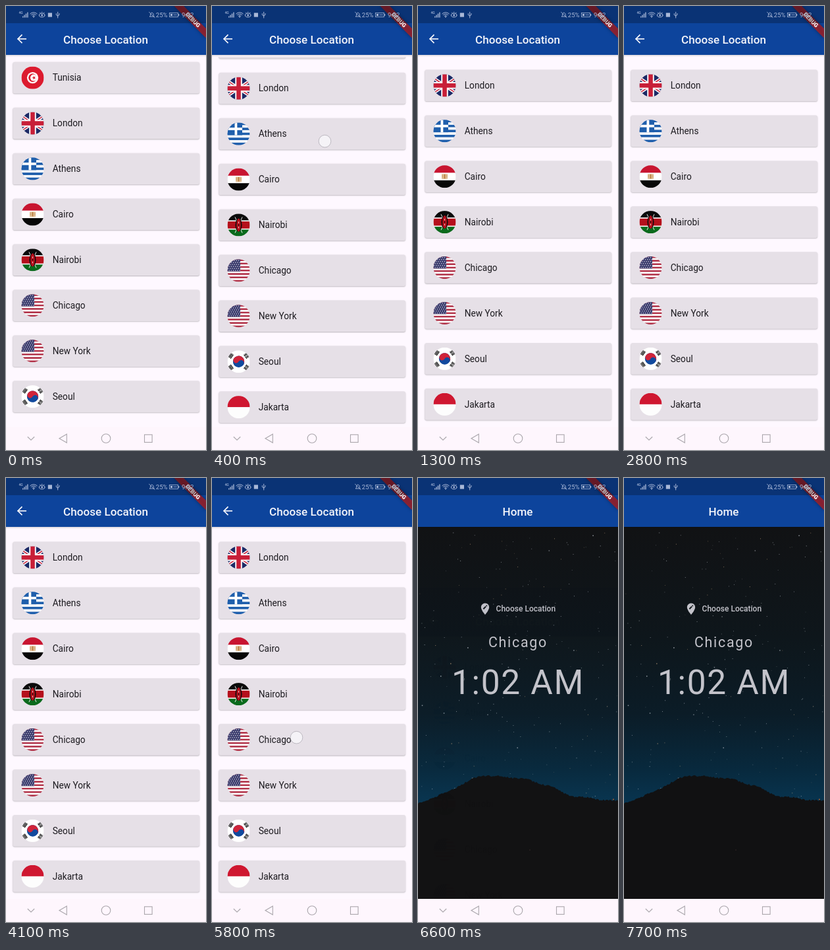
These frames come from a looping animation (304x672 px, 8000 ms). An HTML page with a canvas:

```html
<!DOCTYPE html>
<html lang="en">
<head>
<meta charset="utf-8">
<title>Choose Location</title>
<style>
  html, body { margin: 0; width: 100%; height: 100%; overflow: hidden; background: #fef7ff; }
  canvas { display: block; width: 304px; height: 672px; }
</style>
</head>
<body>
<canvas id="stage"></canvas>
<script>
const W = 304, H = 672, BAR = 74, NAV = 637, LOOP = 8000, STEP = 100;
const MAX_SCROLL = 57.2, PITCH = 68.93, FIRST = 84.8, CARD_H = 47.6;
const POP_START = 6320, POP_TIME = 300;
const BLUE = '#0d449c', FACE = 'Roboto, sans-serif';
const dpr = window.devicePixelRatio || 1;

function setup(canvas) {
  canvas.width = W * dpr;
  canvas.height = H * dpr;
  const c = canvas.getContext('2d');
  c.scale(dpr, dpr);
  return c;
}
const stage = setup(document.getElementById('stage'));
const listLayer = document.createElement('canvas');
const homeLayer = document.createElement('canvas');
const listCtx = setup(listLayer), homeCtx = setup(homeLayer);

const clamp = v => Math.max(0, Math.min(1, v));
const mix = (a, b, k) => a + (b - a) * k;

function random(seed) {
  return () => (seed = (seed * 16807) % 2147483647) / 2147483647;
}

function bezier(x1, y1, x2, y2) {
  const at = (a, b, s) => 3 * (1 - s) * (1 - s) * s * a + 3 * (1 - s) * s * s * b + s * s * s;
  return x => {
    let lo = 0, hi = 1;
    for (let i = 0; i < 24; i++) {
      const mid = (lo + hi) / 2;
      if (at(x1, x2, mid) < x) lo = mid; else hi = mid;
    }
    return at(y1, y2, lo);
  };
}
const fastOutSlowIn = bezier(.4, 0, .2, 1);
const easeIn = bezier(.42, 0, 1, 1);
const easeOut = bezier(0, 0, .58, 1);

function rect(c, color, x, y, w, h) {
  c.fillStyle = color;
  c.fillRect(x, y, w, h);
}
function disc(c, color, x, y, r) {
  c.fillStyle = color;
  c.beginPath();
  c.arc(x, y, r, 0, 7);
  c.fill();
}
function line(c, color, width, ...pts) {
  c.strokeStyle = color;
  c.lineWidth = width;
  c.beginPath();
  for (let i = 0; i < pts.length; i += 2) c.lineTo(pts[i], pts[i + 1]);
  c.stroke();
}
function text(c, str, x, y, size, color, { weight = 400, align = 'left', gap = 0 } = {}) {
  c.font = `${weight} ${size}px ${FACE}`;
  c.letterSpacing = gap + 'px';
  c.textAlign = align;
  c.fillStyle = color;
  c.fillText(str, x, y);
  c.letterSpacing = '0px';
}

// Flags are drawn around 0,0 inside a circle of radius 17.
const stripes = (c, colors) => {
  const h = 34 / colors.length;
  colors.forEach((color, i) => rect(c, color, -17, -17 + i * h, 34, h + .1));
};
const alternate = (n, a, b) => Array.from({ length: n }, (_, i) => i % 2 ? b : a);

const flags = {
  Tunisia(c) {
    rect(c, '#dc1a2e', -17, -17, 34, 34);
    disc(c, '#fff', 0, 0, 8.6);
    disc(c, '#dc1a2e', 0, 0, 6.3);
    disc(c, '#fff', 1.5, 0, 5);
    c.fillStyle = '#dc1a2e';
    c.beginPath();
    for (let i = 0; i < 10; i++) {
      const a = Math.PI + i * Math.PI / 5, r = i % 2 ? 1.2 : 3.1;
      c.lineTo(2 + Math.cos(a) * r, Math.sin(a) * r);
    }
    c.fill();
  },
  London(c) {
    rect(c, '#1c2a66', -17, -17, 34, 34);
    for (const [color, w] of [['#fff', 4.6], ['#c81f38', 1.5]]) {
      line(c, color, w, -20, -13.5, 20, 13.5);
      line(c, color, w, 20, -13.5, -20, 13.5);
    }
    for (const [color, w] of [['#fff', 10.5], ['#c81f38', 6.6]]) {
      rect(c, color, -17, -w / 2, 34, w);
      rect(c, color, -w / 2, -17, w, 34);
    }
  },
  Athens(c) {
    const blue = '#1f5fac';
    stripes(c, alternate(9, blue, '#fff'));
    rect(c, blue, -17, -17, 22.5, 18.9);
    rect(c, '#fff', -17, -9.5, 22.5, 3.8);
    rect(c, '#fff', -6, -17, 3.8, 18.9);
  },
  Cairo(c) {
    stripes(c, ['#c81530', '#fff', '#070707']);
    rect(c, '#e6c8a4', -4.5, -4, 9, 8);
    rect(c, '#c08a4e', -1.3, -3.5, 2.6, 6.5);
    rect(c, '#c99a63', -4, -3, 1.2, 5);
    rect(c, '#c99a63', 2.8, -3, 1.2, 5);
  },
  Nairobi(c) {
    rect(c, '#0b0b0b', -17, -17, 34, 10.5);
    rect(c, '#fff', -17, -7, 34, 14);
    rect(c, '#b5101c', -17, -5.4, 34, 10.8);
    rect(c, '#0a6a1c', -17, 7, 34, 10);
    line(c, '#fff', .9, -5.5, -12, 5.5, 12);
    line(c, '#fff', .9, 5.5, -12, -5.5, 12);
    for (const [color, rx] of [['#0b0b0b', 5], ['#b5101c', 3.4]]) {
      c.fillStyle = color;
      c.beginPath();
      c.ellipse(0, 0, rx, 10, 0, 0, 7);
      c.fill();
    }
    rect(c, '#fff', -.4, -5, .8, 2.4);
    rect(c, '#fff', -.4, 2.6, .8, 2.4);
    disc(c, '#0b0b0b', 0, 0, 1);
  },
  Chicago(c) {
    stripes(c, alternate(13, '#b23349', '#fff'));
    rect(c, '#3a3b6c', -17, -17, 19.5, 18.3);
    for (let row = 0; row < 6; row++)
      for (let col = 0; col < 6; col++)
        disc(c, '#d5d6e4', -16 + col * 3.2 + (row % 2) * 1.6, -15.2 + row * 3, .75);
  },
  Seoul(c) {
    const red = '#d0243a', blue = '#124a9e';
    rect(c, '#fff', -17, -17, 34, 34);
    c.save();
    c.rotate(.5);
    disc(c, blue, 0, 0, 8.7);
    c.fillStyle = red;
    c.beginPath();
    c.arc(0, 0, 8.7, Math.PI, 0);
    c.fill();
    disc(c, red, -4.35, 0, 4.35);
    disc(c, blue, 4.35, 0, 4.35);
    c.restore();
    for (const [sx, sy] of [[-1, -1], [1, -1], [-1, 1], [1, 1]]) {
      c.save();
      c.translate(sx * 11.8, sy * 8.8);
      c.rotate(-sx * sy * .95);
      for (let i = -1; i < 2; i++) rect(c, '#111', -3.7, i * 1.9 - .65, 7.4, 1.3);
      if (sx > 0) rect(c, '#fff', -.3, -3, .6, 6);
      c.restore();
    }
  },
  Jakarta(c) { stripes(c, ['#cf1730', '#fdfdfd']); }
};
flags['New York'] = flags.Chicago;
const cities = ['Tunisia', 'London', 'Athens', 'Cairo', 'Nairobi', 'Chicago', 'New York', 'Seoul', 'Jakarta'];

function appBar(c, title) {
  const shade = c.createLinearGradient(0, BAR, 0, BAR + 3);
  shade.addColorStop(0, 'rgba(0,0,0,.14)');
  shade.addColorStop(1, 'rgba(0,0,0,0)');
  rect(c, shade, 0, BAR, W, 3);
  rect(c, BLUE, 0, 0, W, BAR);
  text(c, title, 151.5, 56.6, 17.1, '#f4f5fa', { weight: 500, align: 'center' });
}

function card(c, city, y, ripple) {
  c.save();
  c.shadowColor = 'rgba(0,0,0,.26)';
  c.shadowBlur = 1.6 * dpr;
  c.shadowOffsetY = .8 * dpr;
  c.fillStyle = '#e6e0e7';
  c.beginPath();
  c.roundRect(10.3, y, 283.8, CARD_H, 3);
  c.fill();
  c.restore();
  if (ripple > 0) {
    c.save();
    c.clip();
    disc(c, 'rgba(29,27,32,.05)', 128, y + 20, 10 + ripple * 200);
    c.restore();
  }
  c.save();
  c.translate(40.5, y + 23.8);
  c.beginPath();
  c.arc(0, 0, 17.1, 0, 7);
  c.clip();
  flags[city](c);
  c.restore();
  text(c, city, 70.7, y + 28.5, 13.71, '#1d1b20');
}

function drawList(t) {
  const c = listCtx;
  const scroll = MAX_SCROLL * easeOut(clamp((t - 50) / 450));
  rect(c, '#fef8ff', 0, 0, W, H);
  c.save();
  c.beginPath();
  c.rect(0, BAR + 3, W, NAV - BAR - 5);
  c.clip();
  cities.forEach((city, i) => {
    const y = FIRST + i * PITCH - scroll;
    const ripple = city === 'Chicago' ? clamp((t - 5950) / 450) : 0;
    if (y > BAR + 1 - CARD_H + 2 && y < NAV - 2) card(c, city, y, ripple);
  });
  c.restore();
  appBar(c, 'Choose Location');
  c.lineCap = 'butt';
  line(c, '#f4f5fa', 1.7, 17.5, 49.8, 31, 49.8);
  line(c, '#f4f5fa', 1.7, 24.5, 43.4, 18.1, 49.8, 24.5, 56.2);
}

function pin(c, x, y, color) {
  c.fillStyle = color;
  c.beginPath();
  c.arc(x, y - 2.4, 6.2, Math.PI * .9, Math.PI * .1);
  c.quadraticCurveTo(x + 4.5, y + 4, x, y + 9);
  c.quadraticCurveTo(x - 4.5, y + 4, x - 5.9, y - .5);
  c.fill();
  line(c, '#11161a', 2, x - 2.6, y + .2, x + 1.2, y - 3.6);
  line(c, '#11161a', 2, x + 1.8, y - 4.2, x + 2.8, y - 5.2);
}

function drawHome() {
  const c = homeCtx, rnd = random(4217);
  const sky = c.createLinearGradient(0, BAR, 0, 490);
  [[0, '#111214'], [.4, '#0e161b'], [.68, '#0b1c27'], [.88, '#08293d'], [1, '#08344f']]
    .forEach(([k, color]) => sky.addColorStop(k, color));
  rect(c, sky, 0, BAR, W, NAV - BAR);
  for (let i = 0; i < 210; i++) {
    const size = rnd() < .12 ? 1.5 : .9;
    c.globalAlpha = mix(.2, .75, rnd());
    rect(c, rnd() < .2 ? '#d9b48c' : '#d5dbe2', rnd() * W, 78 + rnd() * 408, size, size);
  }
  c.globalAlpha = 1;
  disc(c, '#b5602c', 297, 486.5, 1);

  const ridge = [[0, 492], [20, 486], [40, 476], [60, 468], [80, 456], [95, 451], [125, 451], [150, 455],
    [165, 455], [185, 463], [205, 467], [220, 476], [235, 482], [255, 483], [275, 487], [W, 488]];
  c.fillStyle = '#111112';
  c.beginPath();
  c.moveTo(0, NAV);
  for (let x = 0, i = 0; x <= W; x += 2) {
    while (i < ridge.length - 2 && x > ridge[i + 1][0]) i++;
    const [x0, y0] = ridge[i], [x1, y1] = ridge[i + 1];
    c.lineTo(x, mix(y0, y1, (x - x0) / (x1 - x0)) + rnd() * 2.4 - 1.2);
  }
  c.lineTo(W, NAV);
  c.fill();
  disc(c, '#3a2a28', 170, 563, .8);

  appBar(c, 'Home');
  const ink = '#c3c3ca';
  pin(c, 102, 198, ink);
  text(c, 'Choose Location', 118.6, 202.4, 12, ink, { weight: 500 });
  text(c, 'Chicago', 106.9, 256.3, 21.43, ink, { gap: 1.71 });
  text(c, '1:02 AM', 50.9, 327, 51.43, ink, { gap: 1.71 });
}

function banner(c) {
  c.save();
  c.translate(W, 0);
  c.rotate(Math.PI / 4);
  c.shadowColor = 'rgba(0,0,0,.5)';
  c.shadowBlur = 5 * dpr;
  rect(c, 'rgba(183,28,28,.72)', -34.3, 24, 68.6, 10.3);
  c.shadowColor = 'transparent';
  text(c, 'DEBUG', .8, 32, 8.74, '#fff', { weight: 900, align: 'center' });
  c.restore();
}

function statusBar(c) {
  const ink = '#a9b8d8';
  rect(c, 'rgba(0,0,0,.25)', 0, 0, W, 26);
  text(c, '4G', 19.5, 12, 4.8, ink, { weight: 500 });
  for (let i = 0; i < 4; i++) rect(c, ink, 25 + i * 2.4, 15.5 - i * 2, 1.4, 2 + i * 2);
  c.lineCap = 'round';
  c.strokeStyle = ink;
  c.lineWidth = 1;
  for (const r of [2.6, 5, 7.4]) {
    c.beginPath();
    c.arc(42, 17, r, -Math.PI * .75, -Math.PI * .25);
    c.stroke();
  }
  disc(c, ink, 42, 16.6, 1);
  c.beginPath();
  c.ellipse(54.7, 14, 4.3, 2.8, 0, 0, 7);
  c.stroke();
  disc(c, ink, 54.7, 14, 1.4);
  line(c, ink, 1, 51.5, 10, 52.3, 10.8);
  line(c, ink, 1, 54.7, 9, 54.7, 10);
  line(c, ink, 1, 58, 10, 57.2, 10.8);
  rect(c, ink, 63.8, 10.4, 6.2, 6.2);
  line(c, ink, 1, 78.7, 9, 78.7, 18);
  line(c, ink, 1, 76.3, 11.5, 76.3, 13.5, 78.7, 15.3, 81, 13.3, 81, 11.5);

  line(c, ink, .9, 218.5, 16, 219.5, 14.5, 219.5, 12, 222, 9.8, 224.2, 12, 224.2, 14.5, 225.3, 16, 218.5, 16);
  line(c, ink, .9, 217.6, 9.2, 226, 17.6);
  text(c, '25%', 227.8, 17, 9.6, ink);
  c.strokeStyle = ink;
  c.lineWidth = .8;
  c.strokeRect(248.5, 10.5, 13, 6);
  rect(c, ink, 250, 12, 3, 3);
  rect(c, ink, 262, 12.3, 1.3, 2.4);
  line(c, ink, .8, 254.5, 13.5, 259.5, 13.5);
  text(c, '9:02', 267, 17, 9.6, ink);
}

function navBar(c) {
  const ink = '#aaa6ac';
  rect(c, '#fef6fd', 0, NAV, W, H - NAV);
  c.lineCap = 'butt';
  line(c, ink, 1.1, 32.8, 652, 38, 657, 43.2, 652);
  c.strokeStyle = ink;
  c.lineWidth = 1.1;
  c.beginPath();
  c.moveTo(81, 654.5);
  c.lineTo(92.3, 648);
  c.lineTo(92.3, 661);
  c.closePath();
  c.stroke();
  c.beginPath();
  c.arc(152, 654.5, 6.8, 0, 7);
  c.stroke();
  c.strokeRect(210.5, 648.8, 11.6, 11.6);
}

function finger(c, x, y) {
  disc(c, 'rgba(248,246,250,.82)', x, y, 9.3);
  c.strokeStyle = 'rgba(150,146,156,.55)';
  c.lineWidth = 1;
  c.stroke();
}

function draw(t) {
  const c = stage;
  const left = 1 - clamp((t - POP_START) / POP_TIME);
  c.drawImage(homeLayer, 0, 0, W, H);
  if (left > 0) {
    drawList(t);
    c.globalAlpha = easeIn(left);
    c.drawImage(listLayer, 0, (1 - fastOutSlowIn(left)) * H / 4, W, H);
    c.globalAlpha = 1;
  }
  banner(c);
  statusBar(c);
  navBar(c);
  if (t >= 100 && t < 900) finger(c, 171.5, 170 + 150 * Math.pow(clamp((600 - t) / 500), 1.6));
  if (t >= 5800 && t < 6000) finger(c, 128.5, 392.7);
}

drawHome();
function tick() {
  const t = performance.now() % LOOP;
  draw(Math.floor(t / STEP) * STEP);
  requestAnimationFrame(tick);
}
tick();
</script>
</body>
</html>
```
